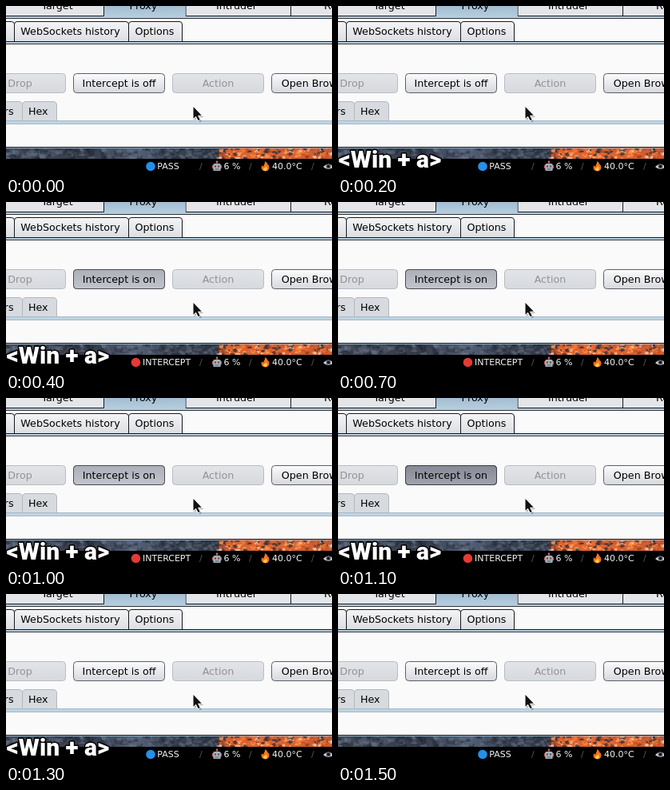
Write an HTML page that moves like this. It is 408x210 px and loops after 1900 ms.

```html
<!DOCTYPE html>
<html lang="en">
<head>
<meta charset="utf-8">
<title>Intercept toggle</title>
<style>
  html, body { margin: 0; width: 100%; height: 100%; overflow: hidden; background: #fafafa; }
  svg { display: block; width: 408px; height: 210px; }
  text { font: 12.7px "DejaVu Sans", sans-serif; fill: #000; }
  .mid { text-anchor: middle; }
  .off { fill: #929398; }
  .bar text { font-size: 11px; fill: #f4f4f4; }
  .bar .sep { fill: #555; }
  .keys {
    font: 900 30px Impact, Roboto, sans-serif;
    fill: #fff; stroke: #000; stroke-width: 3px;
    stroke-linejoin: round; paint-order: stroke;
  }
  .edge { stroke: #14181d; }
  .btn { fill: url(#up); stroke: #5c5f67; }
  .dim { fill: url(#flat); stroke: #b7bbc3; }

  .anim { animation: 1900ms step-end infinite; }
  .keys { animation-name: keys; }
  .on { animation-name: on; }
  .press { animation-name: press; }
  .idle { animation-name: idle; }
  .red { animation-name: red; }
  .blue { animation-name: blue; }
  @keyframes keys {
    0%, 36.842%, 78.947% { opacity: 0; }
    10.526%, 52.631% { opacity: 1; }
  }
  @keyframes on {
    0%, 63.157% { opacity: 0; }
    15.789% { opacity: 1; }
  }
  @keyframes idle {
    0%, 63.157% { opacity: 1; }
    15.789% { opacity: 0; }
  }
  @keyframes press {
    0%, 63.157% { opacity: 0; }
    57.894% { opacity: 1; }
  }
  @keyframes red {
    0%, 68.421% { opacity: 0; }
    21.052% { opacity: 1; }
  }
  @keyframes blue {
    0%, 68.421% { opacity: 1; }
    21.052% { opacity: 0; }
  }
</style>
</head>
<body>
<svg viewBox="0 0 408 210" xmlns="http://www.w3.org/2000/svg">
  <defs>
    <linearGradient id="up" x2="0" y2="1">
      <stop stop-color="#fbfbfc"/><stop offset=".5" stop-color="#e9eaed"/><stop offset="1" stop-color="#d6d8dd"/>
    </linearGradient>
    <linearGradient id="flat" x2="0" y2="1">
      <stop stop-color="#e2e4e8"/><stop offset="1" stop-color="#d6d9dd"/>
    </linearGradient>
    <linearGradient id="down" x2="0" y2="1">
      <stop stop-color="#adb0b9"/><stop offset="1" stop-color="#c2c4cc"/>
    </linearGradient>
    <linearGradient id="deep" x2="0" y2="1">
      <stop stop-color="#878a95"/><stop offset="1" stop-color="#a0a3ad"/>
    </linearGradient>
    <linearGradient id="tab" x2="0" y2="1">
      <stop stop-color="#f4f4f6"/><stop offset="1" stop-color="#dcdee2"/>
    </linearGradient>
    <linearGradient id="chosen" x2="0" y2="1">
      <stop stop-color="#a3bcd1"/><stop offset="1" stop-color="#b7cfdf"/>
    </linearGradient>
    <linearGradient id="photo">
      <stop stop-color="#454b59"/><stop offset=".25" stop-color="#343b49"/>
      <stop offset=".4" stop-color="#536077"/><stop offset=".5" stop-color="#3c4556"/>
      <stop offset=".64" stop-color="#2d3441"/><stop offset=".68" stop-color="#d95f2c"/>
      <stop offset=".8" stop-color="#e5682f"/><stop offset="1" stop-color="#c25a35"/>
    </linearGradient>
    <clipPath id="strip"><path d="M0 178H408V191H0z"/></clipPath>
    <path id="arrow" d="M234.500 126V140.800L237.800 137.700L240.600 143.300L242.700 142.300L240 136.800H244.800z"/>
  </defs>

  <rect width="408" height="210" fill="#fafafb"/>

  <!-- main tabs -->
  <rect width="408" height="12" fill="#e4e5e9"/>
  <rect y="12" width="408" height="4" fill="#b7cfdf"/>
  <path class="edge" fill="none" d="M0 12.500H122.500V0M225 0V12.500H408M356.500 0V12"/>
  <rect x="123" width="101.500" height="15" fill="url(#chosen)"/>
  <path class="edge" d="M0 15.500H408" opacity=".85"/>
  <text class="mid" x="64" y="4">Target</text>
  <text class="mid" x="172" y="4">Proxy</text>
  <text class="mid" x="288.500" y="4">Intruder</text>
  <text x="398" y="4">Repeater</text>

  <!-- proxy tabs -->
  <g class="edge" fill="url(#tab)">
    <path d="M-5 44.500V19.500H7Q10.500 19.500 10.500 23V44.500z"/>
    <path d="M10.500 44.500V23Q10.500 19.500 14 19.500H150Q153.500 19.500 153.500 23V44.500z"/>
    <path d="M153.500 44.500V23Q153.500 19.500 157 19.500H217Q220.500 19.500 220.500 23V44.500z"/>
  </g>
  <rect y="45" width="408" height="2" fill="#b7cfdf"/>
  <path class="edge" d="M0 44.500H408"/>
  <path class="edge" d="M0 47.500H408" opacity=".85"/>
  <text class="mid" x="80.500" y="36">WebSockets history</text>
  <text class="mid" x="186" y="36">Options</text>

  <!-- buttons -->
  <g id="buttons"></g>
  <text class="mid off" x="17.500" y="101">Drop</text>
  <text class="mid off" x="265.500" y="101">Action</text>
  <text class="mid" x="389.500" y="101">Open Browser</text>
  <g class="anim idle"><text class="mid" x="141.500" y="101">Intercept is off</text></g>
  <g class="anim on">
    <rect x="84.500" y="84.500" width="114" height="24" rx="4" fill="url(#down)" stroke="#484b53"/>
    <rect class="anim press" x="84.500" y="84.500" width="114" height="24" rx="4" fill="url(#deep)" stroke="#3a3d44"/>
    <text class="mid" x="141.500" y="101">Intercept is on</text>
  </g>

  <!-- message tabs -->
  <g fill="#d7dade" stroke="#b3b8be">
    <path d="M-5 143.500V119.500H16Q20.500 119.500 20.500 124V143.500z"/>
    <path d="M20.500 143.500V124Q20.500 119.500 25 119.500H59Q63.500 119.500 63.500 124V143.500z"/>
  </g>
  <rect y="143" width="408" height="4" fill="#bfd4e3"/>
  <path d="M0 143.500H408M0 147.500H408" stroke="#a9bac6"/>
  <text x="9.500" y="136" text-anchor="end">Headers</text>
  <text x="28" y="136">Hex</text>
  <path class="edge" d="M0 176.500H408"/>
  <rect y="177" width="408" height="1" fill="#8fb0c8"/>

  <!-- desktop strip -->
  <g id="rocks" clip-path="url(#strip)"><rect y="178" width="408" height="14" fill="url(#photo)"/></g>
  <rect y="191" width="408" height="19"/>

  <g class="bar">
    <g class="anim blue">
      <circle cx="181" cy="200.500" r="5.800" fill="#2390ea"/><text x="189.300" y="204">PASS</text>
    </g>
    <g class="anim red">
      <circle cx="162.500" cy="200.500" r="5.800" fill="#e53935"/><text x="171" y="204">INTERCEPT</text>
    </g>
    <text class="sep" x="242" y="204">/</text>
    <text class="sep" x="304" y="204">/</text>
    <text class="sep" x="382" y="204">/</text>
    <!-- robot -->
    <path d="M258 199h12v4h-12z" fill="#d9534a"/>
    <rect x="259.300" y="197" width="9.400" height="9" rx="1.500" fill="#9fb3bd"/>
    <path d="M264 197v-2.500" stroke="#9fb3bd"/>
    <circle cx="264" cy="194.700" r="1.300" fill="#e5645b"/>
    <path d="M261 199.500h2v2h-2zM265 199.500h2v2h-2z" fill="#7c3d38"/>
    <path d="M261.500 204h5" stroke="#46545c"/>
    <text x="272.500" y="204">6 %</text>
    <!-- flame -->
    <path d="M324 194C328 196 327 199 328.500 198.500C331 203 328 206.500 324.800 206.500C320 206.500 318.500 202.500 320.500 199C321 200.500 322 201 322.500 200C322.500 198 324.500 197 324 194z" fill="#f4711f"/>
    <path d="M325 200C327 202 327.500 206 324.800 206C321.500 206 322 203 323 202C324 203 325 202 325 200z" fill="#ffd23f"/>
    <text x="333" y="204">40.0°C</text>
    <!-- eye -->
    <path d="M397 201Q403.500 194 410 201Q403.500 207 397 201z" fill="#d5d8da"/>
    <circle cx="403.500" cy="200.500" r="3" fill="#546068"/>
    <circle cx="403.500" cy="200.500" r="1.400"/>
  </g>

  <text class="keys anim" x="0.500" y="201.500">&lt;Win + a&gt;</text>

  <!-- pointer with soft shadow -->
  <use href="#arrow" x="1.500" y="1.500" opacity=".35" stroke="#000"/>
  <use href="#arrow" fill="#111" stroke="#fff" stroke-width="2" paint-order="stroke"/>
</svg>
<script>
  const NS = "http://www.w3.org/2000/svg";
  function add(id, tag, attrs) {
    const el = document.createElementNS(NS, tag);
    for (const k in attrs) el.setAttribute(k, attrs[k]);
    document.getElementById(id).append(el);
  }

  for (let i = 0; i < 4; i++) {
    add("buttons", "rect", {
      x: -39.5 + 124 * i, y: 84.5, width: 114, height: 24, rx: 4,
      class: i % 2 ? "btn" : "dim"
    });
  }

  let seed = 17;
  const rnd = () => (seed = seed * 16807 % 2147483647) / 2147483647;
  const pick = list => list[Math.floor(rnd() * list.length)];
  const slate = ["#1d232e", "#2a313e", "#566074", "#687388"];
  const ember = ["#ec5f1c", "#fa7a2e", "#d04a1a", "#f89a5a", "#5b2f2a", "#f6cdb0", "#2f3240"];

  // Rock facets, turning to glowing leaves on the right
  for (let i = 0; i < 420; i++) {
    const x = rnd() * 412 - 2, y = 177 + rnd() * 15;
    const warm = x > 260 + (192 - y) * 0.8;
    const s = warm ? 1.5 + rnd() * 2.5 : 2 + rnd() * 4;
    const p = [0, 1, 2, 3].map(k => {
      const a = (k + rnd() * 0.8) * Math.PI / 2;
      return (x + s * Math.cos(a)).toFixed(1) + "," + (y + s * 0.7 * Math.sin(a)).toFixed(1);
    });
    add("rocks", "polygon", {
      points: p.join(" "), fill: pick(warm ? ember : slate), opacity: warm ? 0.8 : 0.5
    });
  }
</script>
</body>
</html>
```
